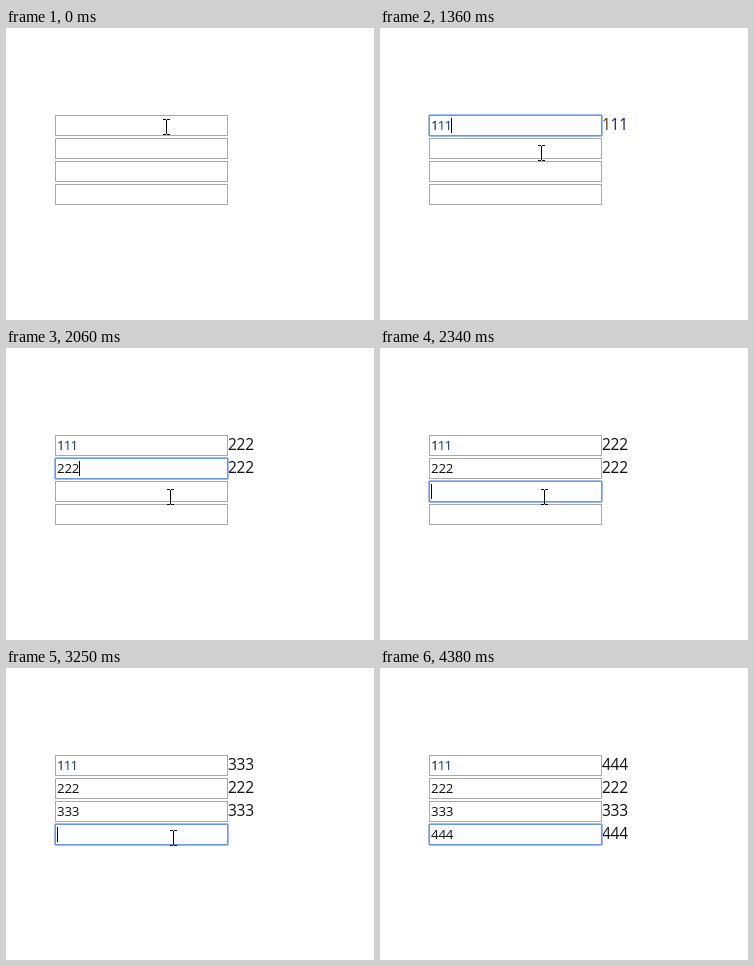
Recreate the animation shown at these times as an HTML page. Size 368x292 px, loop 4500 ms.

```html
<!DOCTYPE html>
<html lang="en">
<head>
<meta charset="utf-8">
<title>Typing into four fields</title>
<style>
  html, body { margin: 0; width: 100%; height: 100%; overflow: hidden; background: #fff; }
  svg { display: block; width: 368px; height: 292px; }
  text { font-family: "Open Sans", "Noto Sans", sans-serif; fill: #111; }
  .value { font-size: 13.33px; }
  .label { font-size: 15.5px; letter-spacing: -0.26px; }
  .box { fill: #fff; stroke: #a9a9a9; }
</style>
</head>
<body>
<svg viewBox="0 0 368 292" xmlns="http://www.w3.org/2000/svg">
  <g id="rows"></g>
  <g id="focus" fill="none">
    <rect x="48.5" y="86.5" width="174" height="22" rx="1.5" stroke="#9dbcf0"/>
    <rect x="49.5" y="87.5" width="172" height="20" stroke="#6b98e0"/>
    <rect id="caret" y="90" width="1" height="15" fill="#000"/>
  </g>
  <path id="beam" fill="#000" d="M-3-8h3v1h1v-1h3v1h-3v14h3v1h-3v-1h-1v1h-3v-1h3v-14h-3z"/>
  <path id="arrow" fill="#000" d="M0 0V12.5L2.8 10L5.3 16L7.5 15L5 9.4H8.8Z"/>
</svg>
<script>
const LOOP = 4500, PITCH = 23;
const $ = id => document.getElementById(id);

// [time, row]
const focuses = [[0, -1], [530, 0], [1490, 1], [2340, 2], [3250, 3]];

// key press times per row; row n types the digit n + 1
const presses = [
  [810, 1060, 1210],
  [1770, 1920, 2060],
  [2590, 2710, 2850],
  [3550, 3680, 3960]
];

// [time, shape, x, y]
const pointer = [
  [0, 'beam', 160, 99], [1210, 'beam', 160, 112], [1360, 'beam', 161, 125],
  [1920, 'beam', 163, 144], [2060, 'beam', 164, 149], [2460, 'beam', 164, 153],
  [2590, 'beam', 165, 168], [2710, 'arrow', 165, 184], [2850, 'arrow', 165, 185],
  [2980, 'arrow', 165, 182], [3130, 'beam', 167, 170], [3550, 'arrow', 174, 186],
  [3680, 'arrow', 190, 217], [3830, 'arrow', 212, 251], [3960, 'arrow', 271, 276],
  [4110, 'arrow', 311, 284], [4230, 'arrow', 338, 286], [4380, 'none', 0, 0]
];
const CARET_OFF = 4380;

const add = (tag, attrs) => {
  const el = document.createElementNS('http://www.w3.org/2000/svg', tag);
  for (const key in attrs) el.setAttribute(key, attrs[key]);
  return $('rows').appendChild(el);
};
const latest = (list, t) => list.filter(item => item[0] <= t).pop();
const advance = row => row === 0 ? 6.8 : 7.4;
const show = (el, on) => el.setAttribute('visibility', on ? 'visible' : 'hidden');

const rows = presses.map((_, i) => {
  const y = i * PITCH;
  add('rect', { class: 'box', x: 49.5, y: 87.5 + y, width: 172, height: 20 });
  const spacing = advance(i) - 7.62;
  return {
    value: add('text', { class: 'value', x: 51, y: 102 + y, 'letter-spacing': spacing }),
    label: add('text', { class: 'label', x: 222, y: 102 + y })
  };
});

// Subpixel fringes tint the ones: first digit and the rest differ.
function write(el, text, first, rest) {
  if (el.dataset.text === text) return;
  el.dataset.text = text;
  el.textContent = '';
  [[text.slice(0, 1), first], [text.slice(1), rest]].forEach(([part, fill]) => {
    if (!part) return;
    const span = document.createElementNS(el.namespaceURI, 'tspan');
    span.textContent = part;
    if (text[0] === '1') span.style.fill = fill;
    el.appendChild(span);
  });
}

function draw(t) {
  const counts = presses.map(times => times.filter(time => time <= t).length);
  const texts = counts.map((n, i) => String(i + 1).repeat(n));
  const last = texts.filter(Boolean).pop() || '';
  rows.forEach((row, i) => {
    write(row.value, texts[i], '#111', '#123a78');
    write(row.label, i === 0 ? last : texts[i], '#5a3408', '#141c60');
  });

  const active = latest(focuses, t)[1];
  const focused = active >= 0;
  show($('focus'), focused);
  show($('caret'), focused && t < CARET_OFF);
  if (focused) {
    $('focus').setAttribute('transform', `translate(0 ${active * PITCH})`);
    $('caret').setAttribute('x', 51 + Math.round(counts[active] * advance(active)));
  }

  const [, shape, x, y] = latest(pointer, t);
  for (const id of ['beam', 'arrow']) {
    show($(id), id === shape);
    $(id).setAttribute('transform', `translate(${x} ${y})`);
  }
}

const start = performance.now();
function tick() {
  draw((performance.now() - start) % LOOP);
  requestAnimationFrame(tick);
}
tick();
</script>
</body>
</html>
```
